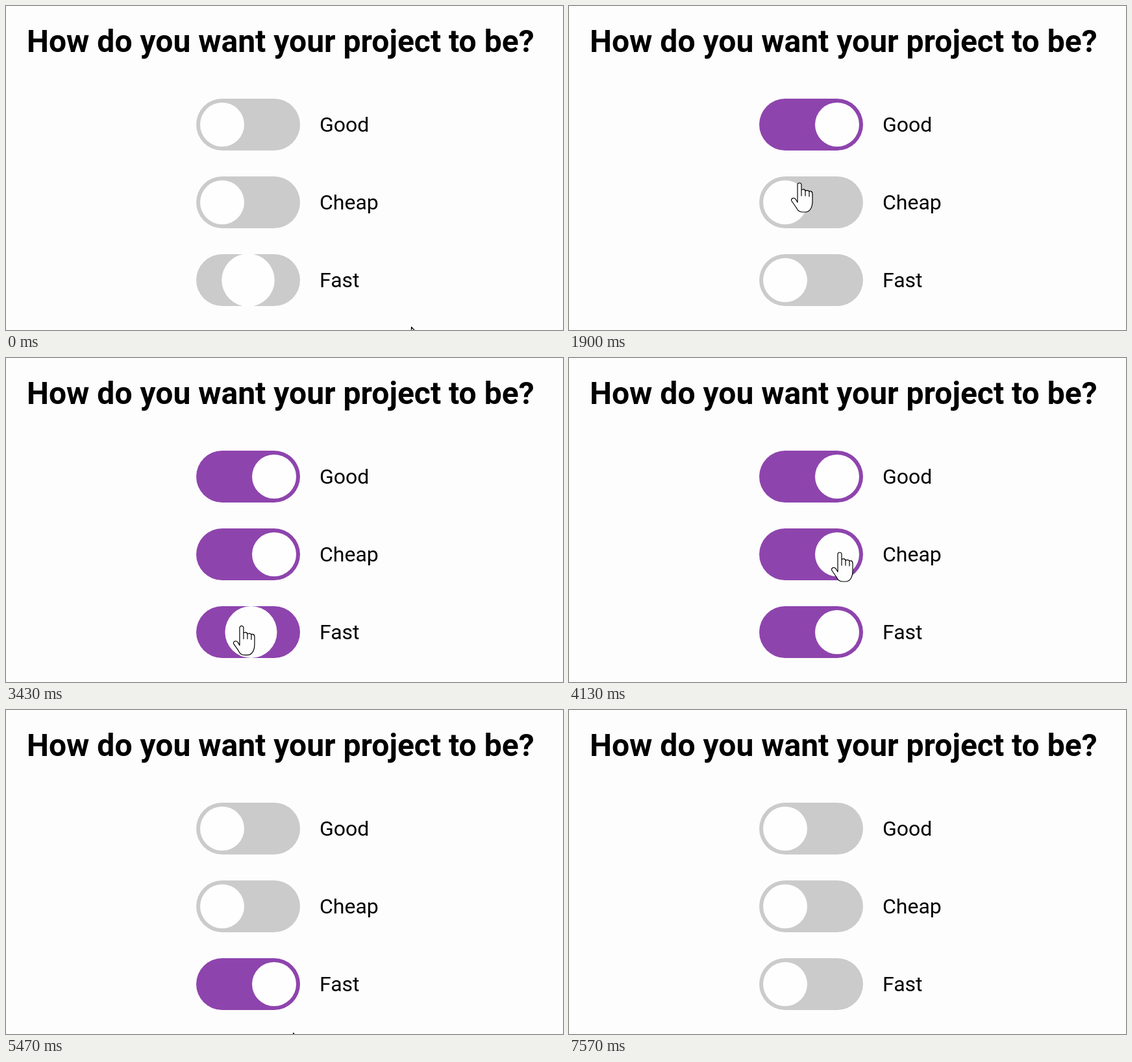
These frames come from a looping animation (858x500 px, 7610 ms). An HTML page:

```html
<!DOCTYPE html>
<html lang="en">
<head>
<meta charset="utf-8">
<title>Project switches</title>
<style>
  html, body { margin: 0; width: 100%; height: 100%; overflow: hidden; background: #fdfdfd; }
  svg { display: block; width: 858px; height: 500px; }
  text { font: 32px Roboto, sans-serif; }
  .title { font-size: 48px; font-weight: 700; }
  .knob { fill: #fefefe; }
  .cursor { fill: #fefefe; stroke: #000; stroke-width: 1.2; stroke-linejoin: round; stroke-linecap: round; }
</style>
</head>
<body>
<svg viewBox="0 0 858 500">
  <text class="title" x="32" y="71">How do you want your project to be?</text>
  <g id="rows"></g>
  <path id="arrow" class="cursor" d="M.5 .5V33L8 26L13 38L17 36L12 25H24Z"/>
  <path id="hand" class="cursor" d="M-3 3C-3 -1 3 -1 3 3V12C3 9 9 9 9 13C9 11 15 11 15 14C15 12 20 12 20 17V28
    C20 38 16 45 9 45H5C-1 45 -3 42 -5 38L-12 28C-14 24 -9 22 -6 25L-3 30ZM3 12V20M9 13V20M15 14V21"/>
</svg>
<script>
const LOOP = 7610, SLIDE = 300;
const OFF = '#cbcbcb', ON = '#8e44ad';
const LEFT = 293, WIDTH = 160, HEIGHT = 80;
const GOOD = 0, CHEAP = 1, FAST = 2;
const $ = id => document.getElementById(id);

// Pointer visits; a switch named here flips as the pointer leaves
const visits = [
  { arrive: 0, leave: 0, x: 624, y: 495 },
  { arrive: 770, leave: 820, x: 401, y: 412 },
  { arrive: 1250, leave: 1350, x: 380, y: 190, flip: GOOD },
  { arrive: 1900, leave: 2550, x: 355, y: 273, flip: CHEAP },
  { arrive: 2753, leave: 3250, x: 355, y: 430, flip: FAST },
  { arrive: 4060, leave: 4200, x: 417, y: 300, flip: CHEAP },
  { arrive: 4550, leave: 4650, x: 400, y: 190, flip: GOOD },
  { arrive: 5470, leave: 5470, x: 442, y: 498 },
  { arrive: 5750, leave: 5850, x: 400, y: 425, flip: FAST },
  { arrive: 6300, leave: LOOP, x: 420, y: 510 }
];

const smooth = p => p * p * (3 - 2 * p);
const mix = (a, b, p) => a + (b - a) * p;

const switches = ['Good', 'Cheap', 'Fast'].map((label, row) => {
  const y = 183 + 120 * row;
  const g = document.createElementNS('http://www.w3.org/2000/svg', 'g');
  g.innerHTML = `<rect x="${LEFT}" y="${y - HEIGHT / 2}" width="${WIDTH}" height="${HEIGHT}" rx="${HEIGHT / 2}"/>
    <circle class="knob" cy="${y}"/><text x="483" y="${y + 11}">${label}</text>`;
  $('rows').append(g);
  const [track, knob] = g.children;
  // All start off; Fast is still halfway through its slide
  const first = row === FAST ? -SLIDE / 2 : -SLIDE;
  const flips = [first, ...visits.filter(v => v.flip === row).map(v => v.leave)];
  return { y, track, knob, flips };
});

function drawSwitch({ track, knob, flips }, t) {
  const last = flips.filter(f => f <= t).length - 1;
  const on = last % 2 === 1;
  const p = Math.min(1, (t - flips[last]) / SLIDE);
  // The knob eases to the middle, then eases on to the end
  const moved = p < .5 ? smooth(p * 2) / 2 : .5 + smooth(p * 2 - 1) / 2;
  const grow = 1 + .2 * (1 - Math.abs(moved * 2 - 1));
  track.setAttribute('fill', on ? ON : OFF);
  knob.setAttribute('cx', LEFT + 40 + 80 * (on ? moved : 1 - moved));
  knob.setAttribute('r', 34 * grow);
}

function pointerAt(t) {
  const i = visits.findIndex(v => v.leave > t);
  const from = visits[i - 1], to = visits[i];
  const p = smooth(Math.min(1, (t - from.leave) / (to.arrive - from.leave)));
  return [mix(from.x, to.x, p), mix(from.y, to.y, p)];
}

function drawPointer(t) {
  const [x, y] = pointerAt(t);
  const over = x > LEFT && x < LEFT + WIDTH && switches.some(s => Math.abs(y - s.y) < HEIGHT / 2);
  for (const [id, shown] of [['hand', over], ['arrow', !over]]) {
    $(id).setAttribute('transform', `translate(${x} ${y})`);
    $(id).setAttribute('visibility', shown ? 'visible' : 'hidden');
  }
}

const start = performance.now();
function draw(now) {
  const t = Math.max(0, now - start) % LOOP;
  for (const s of switches) drawSwitch(s, t);
  drawPointer(t);
  requestAnimationFrame(draw);
}
draw(start);
</script>
</body>
</html>
```
